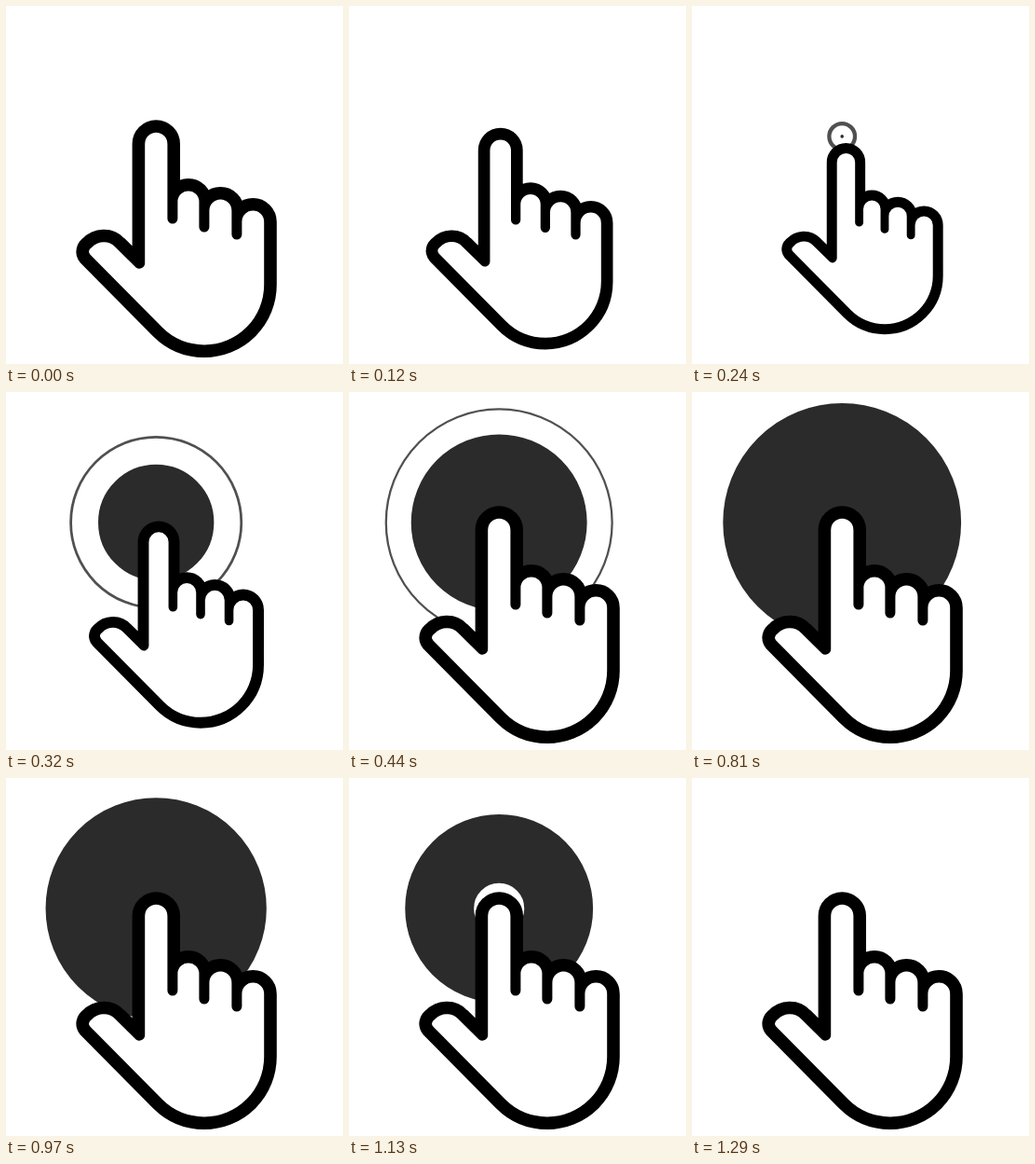
Write an HTML page that moves like this. It is 362 px wide and 384 px high and loops after 1450 ms.

```html
<!DOCTYPE html>
<html lang="en">
<head>
<meta charset="utf-8">
<title>Tap</title>
<style>
  html, body { margin: 0; width: 100%; height: 100%; overflow: hidden; background: #fff; }
  svg { display: block; width: 100vw; height: 100vh; }
</style>
</head>
<body>
<svg viewBox="0 0 362 384">
  <g fill="none" transform="translate(161.2 139.9)">
    <circle id="ring" stroke="#505050"/>
    <circle id="disc" stroke="#2b2b2b"/>
  </g>
  <path id="hand" fill="#fff" stroke="#000" stroke-width="27.2" stroke-linejoin="round" paint-order="stroke"
    d="M149.2 276V147.9A12.1 12.1 0 0 1 173.4 147.9V228A5.5 5.5 0 0 0 184.4 228V210
       A11.5 11.5 0 0 1 207.4 210V237A5.5 5.5 0 0 0 218.4 237V219.5
       A12 12 0 0 1 242.4 219.5V245A5.5 5.5 0 0 0 253.4 245V231.5
       A11.9 11.9 0 0 1 277.2 231.5V299.1A64.3 64.3 0 0 1 213 363.4
       A64.3 64.3 0 0 1 167.6 344.6L90.3 266.6Q87 262.5 92 259
       C98.5 252 110.5 251 117.6 258.8L139.6 280.4A6 6 0 0 0 149.2 276Z"/>
</svg>
<script>
const LOOP = 1450, STEP = 40, FULL = 128;
const [ring, disc, hand] = ['ring', 'disc', 'hand'].map(id => document.getElementById(id));
const clamp = (v, lo = 0, hi = 1) => Math.min(hi, Math.max(lo, v));
const settle = (s, tau) => 1 - Math.exp(-s / tau);

// 25 pictures a second, with a rest at each end and one in the middle
function snap(t) {
  if (t < 80) return 0;
  if (t >= 1290) return 1290;
  if (t >= 600 && t < 690) return 600;
  const base = t < 600 ? 80 : 690;
  return base + Math.floor((t - base) / STEP) * STEP;
}

function circle(el, r, width) {
  const on = r > 0 && width > 0;
  el.style.display = on ? '' : 'none';
  if (!on) return;
  el.setAttribute('r', r);
  el.setAttribute('stroke-width', width);
}

function draw(t) {
  // Press and release, about the middle of the hand
  const press = t > 40 && t < 440 ? (1 - Math.cos((t - 40) / 200 * Math.PI)) / 2 : 0;
  hand.setAttribute('transform',
    `translate(182.5 249.5) scale(${1 - 0.195 * press}) translate(-182.5 -249.5)`);

  // Thin outer wave
  const wave = t - 232;
  const fade = clamp((760 - t) / 110);
  circle(ring, wave > 0 ? FULL * settle(wave, 70) : 0,
    (2.2 + 2.4 * Math.exp(-wave / 60)) * fade);

  // Solid disc grows, then thins to a band around half its radius
  const grow = t - 238.5;
  const size = grow > 0 ? Math.min(FULL, 81.6 * settle(grow, 73) + 0.0895 * grow) : 0;
  const thin = Math.max(0, (t - 800) / 565) ** 1.6;
  circle(disc, t < 1290 ? size / 2 : 0, size * (1 - thin));
}

function tick() {
  draw(snap(performance.now() % LOOP));
  requestAnimationFrame(tick);
}
tick();
</script>
</body>
</html>
```
